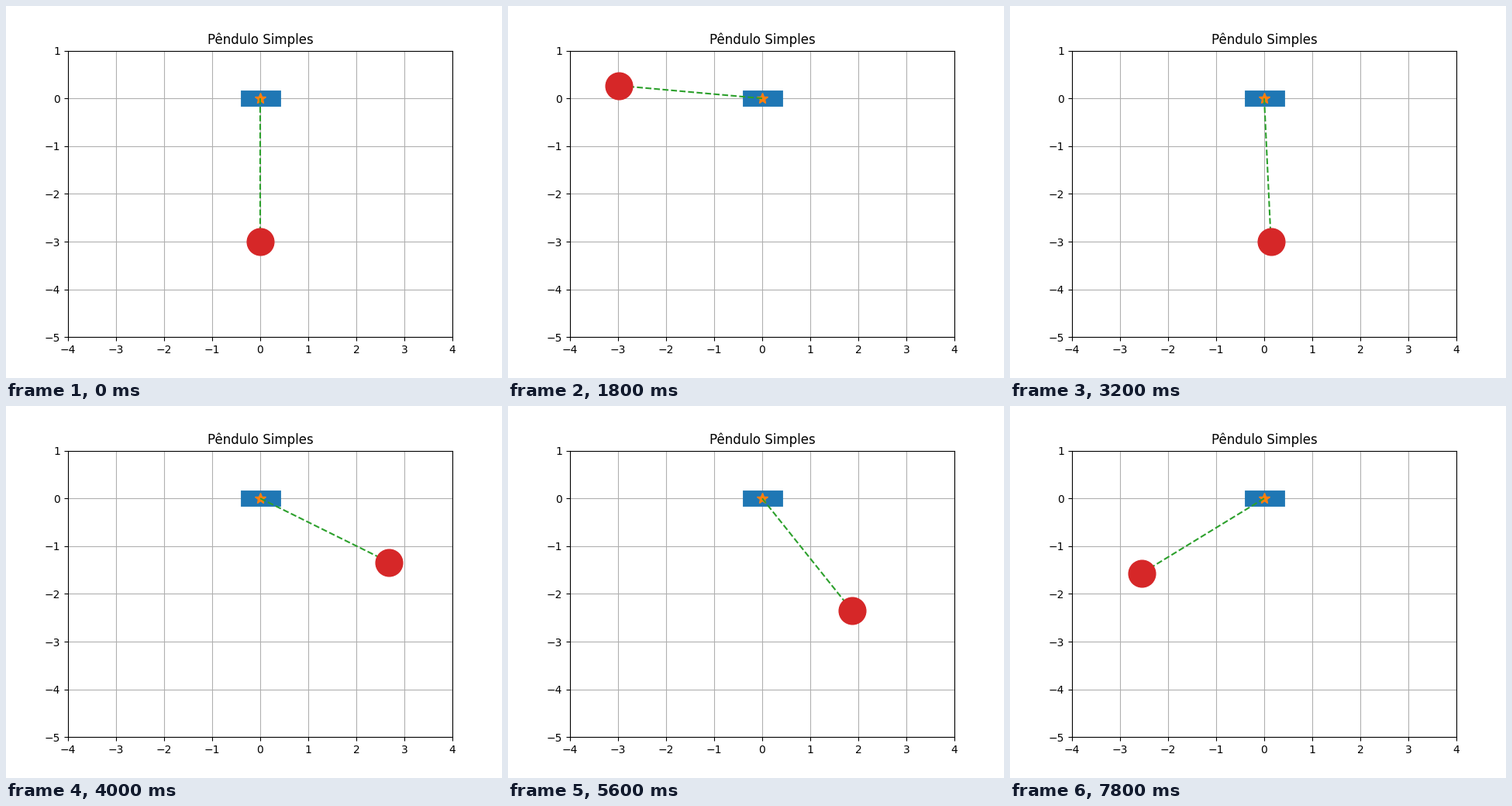
Write a matplotlib script that moves like this. It is 640x480 px and loops after 8000 ms.

```python
import numpy as np
import matplotlib.pyplot as plt
from matplotlib.animation import FuncAnimation

FRAMES = 40
INTERVAL = 200
LENGTH = 3.0
SUBSTEPS = 8

# Key poses: frame index and angle from the vertical in degrees
POSES = np.array([
    (6, -93.6), (9, -95.3), (12, -67.4), (16, 2.8), (18, 37.85), (20, 63.75),
    (28, 38.5), (30, 7.8), (32, -22.8), (36, -60.3), (39, -58.5),
])


def swing(params):
    """Angles of a damped pendulum released at the bottom, one per frame."""
    speed, omega, damping = params

    def rate(s):
        return np.array([s[1], -omega**2 * np.sin(s[0]) - damping * s[1]])

    dt = INTERVAL / 1000 / SUBSTEPS
    state = np.array([0.0, speed])
    angles = [0.0]
    for _ in range(FRAMES - 1):
        for _ in range(SUBSTEPS):
            k1 = rate(state)
            k2 = rate(state + dt / 2 * k1)
            k3 = rate(state + dt / 2 * k2)
            k4 = rate(state + dt * k3)
            state = state + dt / 6 * (k1 + 2 * k2 + 2 * k3 + k4)
        angles.append(state[0])
    return np.array(angles)


def fit(params, rounds=8, eps=1e-5):
    """Gauss-Newton: tune speed, frequency and damping to the key poses."""
    index = POSES[:, 0].astype(int)
    goal = np.radians(POSES[:, 1])
    for _ in range(rounds):
        now = swing(params)[index]
        slopes = [(swing(params + eps * e)[index] - now) / eps
                  for e in np.eye(len(params))]
        step = np.linalg.lstsq(np.array(slopes).T, goal - now, rcond=None)[0]
        params = params + step
    return params


theta = swing(fit(np.array([-2.0, 1.213, 0.13])))

fig, ax = plt.subplots(figsize=(6.4, 4.8), dpi=100)
ax.set_title("Pêndulo Simples")
ax.set_xlim(-4, 4)
ax.set_ylim(-5, 1)
ax.grid(True)

ax.plot([-0.25, 0.25], [0, 0], color="C0", lw=15)
ax.plot([0], [0], "*", color="C1", ms=10)
rod, = ax.plot([], [], "--", color="C2")
bob, = ax.plot([], [], "o", color="C3", ms=25)


def draw(i):
    x = LENGTH * np.sin(theta[i])
    y = -LENGTH * np.cos(theta[i])
    rod.set_data([0, x], [0, y])
    bob.set_data([x], [y])
    return rod, bob


anim = FuncAnimation(fig, draw, frames=FRAMES, interval=INTERVAL,
                     repeat=True, repeat_delay=0)
plt.show()
```
